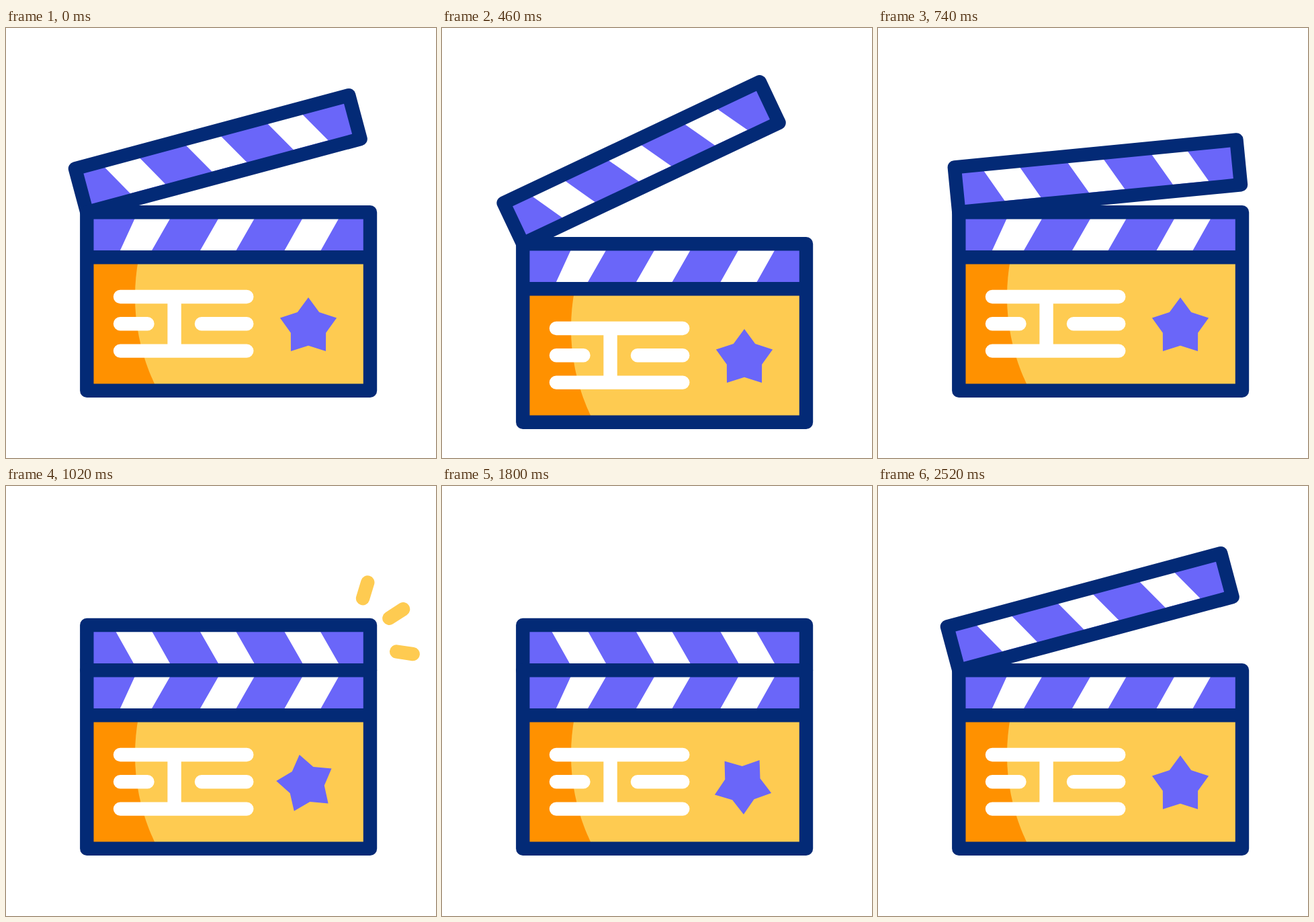
An HTML page that plays this animation: 640x640 px, repeating every 2.6 s.

```html
<!DOCTYPE html>
<html lang="en">
<head>
<meta charset="utf-8">
<title>Clapperboard</title>
<style>
  html, body { margin: 0; width: 100%; height: 100%; overflow: hidden; background: #fff; }
  svg { display: block; width: 100%; height: 100%; }
  .frame { fill: none; stroke: #032a76; stroke-width: 20.4; stroke-linejoin: round; }
  .violet { fill: #6a66f9; }
  .white { fill: #fff; }
  .lines { fill: none; stroke: #fff; stroke-width: 20.4; stroke-linecap: round; }
  .accent { fill: none; stroke: #fecb51; stroke-width: 20.4; stroke-linecap: round; }
</style>
</head>
<body>
<svg viewBox="0 0 640 640">
  <defs>
    <clipPath id="panel"><rect x="121" y="342" width="421" height="197"/></clipPath>
  </defs>
  <g id="board">
    <g id="arm">
      <rect class="violet" x="120.3" y="207" width="421.7" height="67.2"/>
      <path class="white" d="M163 216h54l27 48h-54zM288.5 216h53.5l27.5 48h-53.5zM414 216h53.5l27.5 48h-53.5z"/>
      <rect class="frame" x="120.3" y="207" width="421.7" height="67.2"/>
    </g>
    <rect class="violet" x="120.3" y="274.3" width="421.7" height="67"/>
    <path class="white" d="M191.5 284h52.5l-27.5 48h-47zM316 284h53.5l-27.5 48h-53.5zM441 284h54l-27 48h-54z"/>
    <g clip-path="url(#panel)">
      <rect x="120" y="341" width="423" height="199" fill="#ff9100"/>
      <circle cx="496" cy="400" r="304" fill="#fecb51"/>
    </g>
    <path class="frame" d="M120.3 274.3H542V539.7H120.3zM120.3 341.3H542"/>
    <path class="lines" d="M170 400H358.3M170 440.3H210.5M291 440.3H358.3M170 480.6H358.3M250.6 400V480.6"/>
    <polygon id="star" class="violet"/>
  </g>
  <path id="rays" class="accent"/>
  <path id="swoosh" class="accent"/>
</svg>
<script>
const LOOP = 2600;
const el = id => document.getElementById(id);
const board = el('board'), arm = el('arm'), star = el('star'), rays = el('rays'), swoosh = el('swoosh');

const smooth = u => (1 - Math.cos(Math.PI * u)) / 2;
const speedUp = u => u * u;

// Each step: time, value, easing towards that value
const tracks = {
  drop: [[0, 0], [238, 0], [420, 47], [558, 47], [665, 0], [745, 0], [778, 7], [860, 0]],
  tilt: [[0, 15], [238, 15], [414, 25.3], [514, 25.3], [662, 20], [755, 0, speedUp], [1881, 0], [2517, 15]],
  spin: [[0, 0], [795, 0], [1375, 180], [1973, 0]],
  rayTip: [[0, 72], [820, 72], [1220, 121]],
  rayTail: [[0, 72], [1180, 72], [1580, 121]],
  arcHead: [[0, 20], [1930, 20], [2240, -105]],
  arcTail: [[0, 20], [2220, 20], [2480, -105]]
};

function valueAt(steps, t) {
  const i = steps.findIndex(s => s[0] > t);
  if (i < 0) return steps[steps.length - 1][1];
  const [t0, a] = steps[i - 1], [t1, b, ease = smooth] = steps[i];
  return a + (b - a) * ease((t - t0) / (t1 - t0));
}

function polar(cx, cy, r, deg) {
  const a = deg * Math.PI / 180;
  return (cx + r * Math.cos(a)).toFixed(2) + ' ' + (cy + r * Math.sin(a)).toFixed(2);
}

star.setAttribute('points', Array.from({ length: 10 }, (_, i) =>
  polar(450, 445.2, i % 2 ? 27.5 : 44.3, i * 36 - 90)).join(' '));

function draw(t) {
  const v = {};
  for (const name in tracks) v[name] = valueAt(tracks[name], t);

  board.setAttribute('transform', `translate(0 ${v.drop})`);
  arm.setAttribute('transform', `rotate(${-v.tilt} 120.3 274.2)`);
  star.setAttribute('transform', `rotate(${v.spin} 450 441)`);

  rays.setAttribute('d', v.rayTip - v.rayTail < 0.1 ? '' : [-73, -33, 8.4].map(a =>
    `M${polar(510, 236, v.rayTail, a)}L${polar(510, 236, v.rayTip, a)}`).join(''));

  swoosh.setAttribute('d', v.arcTail - v.arcHead < 0.1 ? '' :
    `M${polar(492, 182, 104, v.arcTail)}A104 104 0 0 0 ${polar(492, 182, 104, v.arcHead)}`);
}

const start = performance.now();
function tick() {
  draw((performance.now() - start) % LOOP);
  requestAnimationFrame(tick);
}
tick();
</script>
</body>
</html>
```
